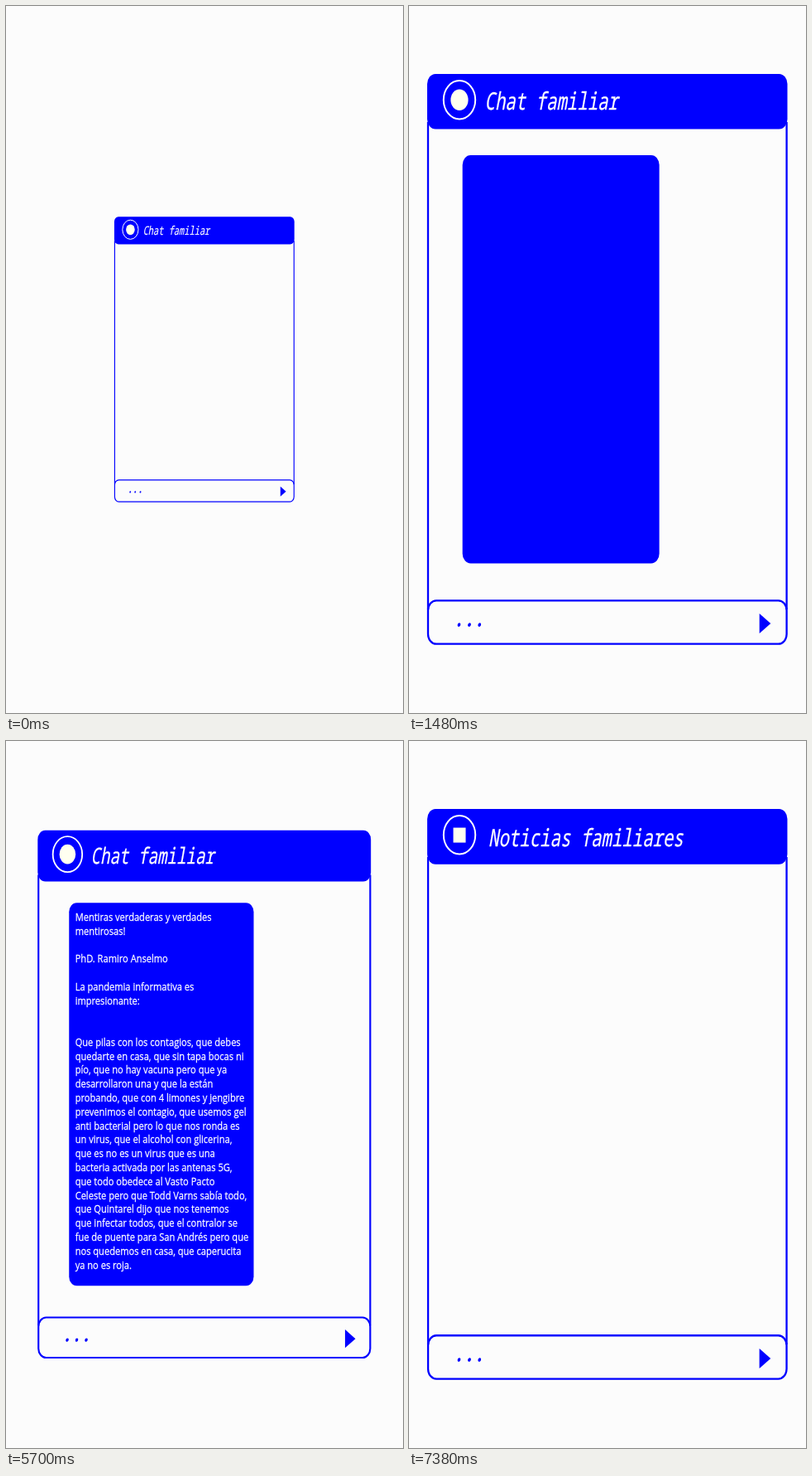
An HTML page for the animation above (8000 ms loop, 480 px wide and 853 px high).

```html
<!DOCTYPE html>
<html lang="es">
<head>
<meta charset="utf-8">
<title>Chat</title>
<style>
  html, body { margin: 0; width: 100%; height: 100%; overflow: hidden; background: #fcfcfc; }
  svg { display: block; width: 100vw; height: 100vh; }
  text { white-space: pre; }
  .mono { font: italic 20.7px "Noto Sans Mono", monospace; }
  .title { fill: #fff; stroke: #fff; stroke-width: 0.25; }
  .dots { fill: #00f; stroke: #00f; stroke-width: 1; }
  .body { font: 12px "Open Sans", sans-serif; fill: #fff; stroke: #fff; stroke-width: 0.25; }
  .line { fill: none; stroke: #00f; stroke-width: 2.3; }
  .solid { fill: #00f; }
</style>
</head>
<body>
<svg viewBox="0 0 480 853">
  <g id="panel">
    <path class="line" d="M23 140V728M456.6 140V728"/>
    <rect class="solid" x="22" y="82" width="435.5" height="66.6" rx="10" ry="12"/>
    <ellipse cx="61" cy="113.2" rx="19.2" ry="23.2" fill="none" stroke="#fff" stroke-width="2"/>
    <ellipse id="disc" cx="61" cy="113.2" rx="10.6" ry="12.8" fill="#fffff0"/>
    <rect id="square" x="53.5" y="104.5" width="15" height="18" fill="#fffff0"/>
    <text id="title" class="mono title"></text>
    <rect class="line" x="23" y="717.3" width="433.6" height="52.4" rx="10" ry="12"/>
    <text class="mono dots" transform="translate(54 748.2) scale(1 1.2)">...</text>
    <path class="solid" d="M423.7 733L437.3 745L423.7 757Z"/>
    <g id="bubble">
      <rect class="solid" x="63" y="176.5" width="241.3" height="499.5" rx="10" ry="12"/>
      <g id="message" class="body" transform="translate(71 199.8) scale(1 1.2)"></g>
    </g>
  </g>
</svg>
<script>
const LOOP = 8000;
const LINE_HEIGHT = 18.15 / 1.2;
const CHARS_PER_MS = 0.2118;
const LINES = `Mentiras verdaderas y verdades
mentirosas!

PhD. Ramiro Anselmo

La pandemia informativa es
impresionante:


Que pilas con los contagios, que debes
quedarte en casa, que sin tapa bocas ni
pío, que no hay vacuna pero que ya
desarrollaron una y que la están
probando, que con 4 limones y jengibre
prevenimos el contagio, que usemos gel
anti bacterial pero lo que nos ronda es
un virus, que el alcohol con glicerina,
que es no es un virus que es una
bacteria activada por las antenas 5G,
que todo obedece al Vasto Pacto
Celeste pero que Todd Varns sabía todo,
que Quintarel dijo que nos tenemos
que infectar todos, que el contralor se
fue de puente para San Andrés pero que
nos quedemos en casa, que caperucita
ya no es roja.`.split('\n');

const $ = id => document.getElementById(id);
const progress = (t, start, length) => Math.min(1, Math.max(0, (t - start) / length));
const easeOut = (p, power) => 1 - (1 - p) ** power;
const show = (node, visible) => node.setAttribute('display', visible ? 'inline' : 'none');
const scaleAbout = (node, x, y, s) =>
  node.setAttribute('transform', `translate(${x} ${y}) scale(${s}) translate(${-x} ${-y})`);

const rows = LINES.map((line, i) => {
  const row = document.createElementNS('http://www.w3.org/2000/svg', 'text');
  row.setAttribute('y', i * LINE_HEIGHT);
  return $('message').appendChild(row);
});

function panelScale(t) {
  if (t < 200) return 0.5 + 0.5 * easeOut(t / 200, 2);
  if (t < 5680) return 1 - 0.205 * Math.sin(Math.PI * progress(t, 440, 600)) ** 2;
  if (t < 6820) return 1 - progress(t, 5680, 267);
  return easeOut(progress(t, 6820, 640), 4);
}

function typeMessage(t) {
  let left = t < 1650 ? 0 : Math.floor((t - 1623) * CHARS_PER_MS);
  LINES.forEach((line, i) => {
    const typed = line.slice(0, Math.max(0, left));
    if (rows[i].textContent !== typed) rows[i].textContent = typed;
    left -= line.length + 1;
  });
}

function draw(elapsed) {
  const t = elapsed % LOOP;
  const news = t >= 6400;
  scaleAbout($('panel'), 239.8, 426.4, panelScale(t));
  show($('disc'), !news);
  show($('square'), news);
  $('title').textContent = news ? 'Noticias familiares' : 'Chat familiar';
  $('title').setAttribute('transform', `translate(${news ? '96 126.5' : '91.5 125'}) scale(1 1.4)`);
  show($('bubble'), t > 1180 && !news);
  scaleAbout($('bubble'), 183.6, 426.3, easeOut(progress(t, 1180, 340), 2));
  typeMessage(t);
}

let begin;
function tick(now) {
  begin ??= now;
  draw(now - begin);
  requestAnimationFrame(tick);
}
draw(0);
requestAnimationFrame(tick);
</script>
</body>
</html>
```
